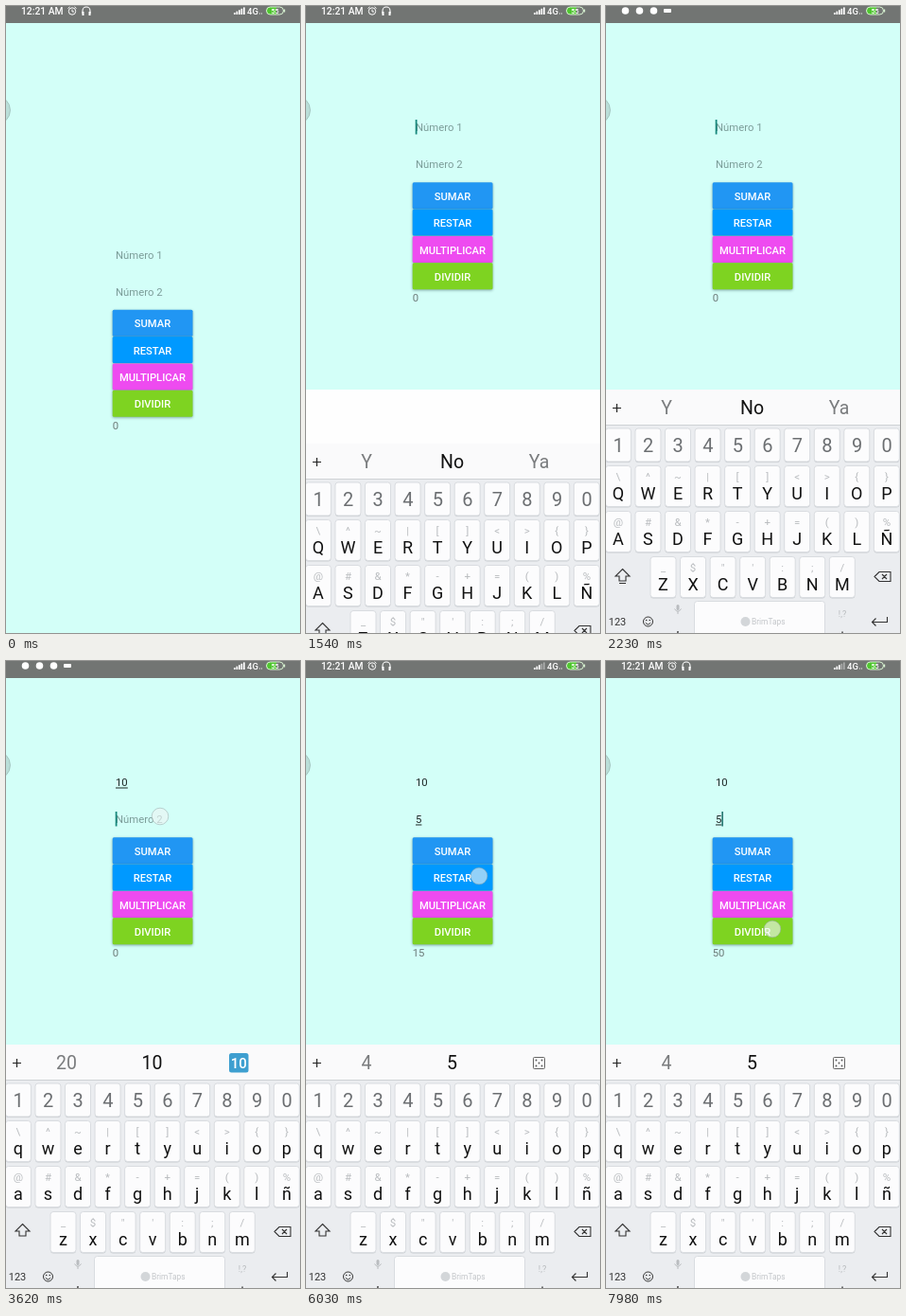
These frames come from a looping animation (311x662 px, 8 s). An HTML page with a canvas:

```html
<!DOCTYPE html>
<html lang="es">
<head>
<meta charset="utf-8">
<title>Calculadora</title>
<style>
html, body { margin: 0; width: 311px; height: 662px; overflow: hidden; }
canvas { display: block; }
</style>
</head>
<body>
<canvas id="stage" width="311" height="662"></canvas>
<script>
const c = document.getElementById('stage').getContext('2d');
const LOOP = 8000;
const OPEN = 1430, FIRST = 2500, SECOND = 2920, NEXT = 3580, FIVE = 4370;

const BUTTONS = [['SUMAR', '#2196f3'], ['RESTAR', '#0099ff'], ['MULTIPLICAR', '#ee4bf0'], ['DIVIDIR', '#7ed321']];
const ROWS = [
  { y: 485, x: 0, keys: 'QWERTYUIOP', marks: '\\^~|[]<>{}' },
  { y: 533, x: 0, keys: 'ASDFGHJKLÑ', marks: '@#&*-+=()%' },
  { y: 581, x: 47, keys: 'ZXCVBNM', marks: '_$"\':;/' }
];
// x, y, press, release
const TAPS = [
  [150, 262, 1250, 1380], [13, 463, 2440, 2570], [298, 463, 2890, 3020],
  [163, 164, 3560, 3720], [135, 461, 4330, 4400], [176, 200, 5120, 5200],
  [183, 227, 6030, 6170], [180, 257, 6950, 7130], [176, 283, 7930, 8100]
];
const CARET = [[360, 850], [1250, 1740], [2230, 2690], [2890, 3420], [3560, 4100],
  [4370, 4830], [5250, 5700], [6140, 6590], [7030, 7480], [7930, 8000]];

const clamp = v => Math.max(0, Math.min(1, v));
const ramp = (t, from, to) => clamp((t - from) / (to - from));
// Last value whose start time has passed
const pick = (t, steps) => steps.filter(s => t >= s[0]).pop()[1];

function text(s, x, y, size, color, align = 'left', weight = 400) {
  c.font = `${weight} ${size}px Roboto, sans-serif`;
  c.textAlign = align;
  c.fillStyle = color;
  c.fillText(s, x, y);
}

function box(x, y, w, h, r, fill, stroke) {
  c.beginPath();
  c.roundRect(x, y, w, h, r);
  if (fill) { c.fillStyle = fill; c.fill(); }
  if (stroke) { c.strokeStyle = stroke; c.stroke(); }
}

function disc(x, y, r, fill, stroke) {
  c.beginPath();
  c.arc(x, y, r, 0, 7);
  if (fill) { c.fillStyle = fill; c.fill(); }
  if (stroke) { c.strokeStyle = stroke; c.stroke(); }
}

function line(d, color, width = 1) {
  c.strokeStyle = color;
  c.lineWidth = width;
  c.stroke(new Path2D(d));
  c.lineWidth = 1;
}

function rect(x, y, w, h, fill) {
  c.fillStyle = fill;
  c.fillRect(x, y, w, h);
}

function status(t) {
  rect(0, 0, 311, 18, '#727573');
  c.globalAlpha = t < 3000 ? 1 - ramp(t, 1720, 1860) : ramp(t, 4350, 4610);
  text('12:21 AM', 16, 9, 10.3, '#fff', 'left', 500);
  disc(70, 5.5, 3.7, null, '#fff');
  line('M70 3.5V6H72M65.5 2.5L67.5 .8M74.5 2.5L72.5 .8', '#fff');
  line('M81 8V5A4 4 0 0 1 89 5V8', '#fff', 1.1);
  rect(80.5, 6, 2, 4, '#fff');
  rect(87.5, 6, 2, 4, '#fff');
  c.globalAlpha = t < 3000 ? ramp(t, 1860, 2020) : 1 - ramp(t, 4200, 4350);
  for (const x of [20.5, 35.5, 50.5]) disc(x, 5, 3.8, '#fff');
  box(61, 3, 8, 4, 1, '#fff');
  c.globalAlpha = 1;
  for (let i = 0; i < 5; i++) {
    const h = 2 + i * 1.4;
    rect(241 + i * 2.5, 9 - h, 1.7, h, t > 5200 && i > 2 ? '#a9abaa' : '#fff');
  }
  text('4G', 255, 9, 9.5, '#fff', 'left', 500);
  rect(268, 7, 1, 2, '#b5b7b6');
  rect(270, 7, 1, 2, '#b5b7b6');
  box(275.5, 1, 18, 8, 4, '#727573');
  box(275.5, 1, 10.5, 8, [4, 0, 0, 4], '#4fc62f');
  box(275.5, 1, 18, 8, 4, null, '#d9f5d3');
  rect(294, 3.5, 1.2, 3, '#d9f5d3');
  text('55', 284.5, 7.7, 7.2, '#fff', 'center', 500);
}

function field(value, hint, y, underline) {
  text(value || hint, 116, y, 11.3, value ? '#1d2625' : '#7c9d99');
  if (value && underline) rect(116, y + 1.5, value.length * 6.4, 1, '#1d2625');
}

function app(t) {
  rect(0, 0, 311, 662, '#d3fff8');
  const up = t >= OPEN ? 134.5 : 0;
  const first = pick(t, [[0, ''], [FIRST, '1'], [SECOND, '10']]);
  const second = t >= FIVE ? '5' : '';
  const y1 = 266.5 - up, y2 = 305.5 - up;
  field(first, 'Número 1', y1, t < 3720);
  field(second, 'Número 2', y2, true);

  if (CARET.some(([a, b]) => t >= a && t < b)) {
    const onSecond = t >= NEXT;
    const n = (onSecond ? second : first).length;
    rect(n ? 116 + n * 6.4 : 115.7, (onSecond ? y2 : y1) - 12, n ? 1.5 : 1.8, 15.5, n ? '#176b65' : '#16877c');
  }

  BUTTONS.forEach(([label, color], i) => {
    const y = 320.8 - up + i * 28.3;
    c.save();
    c.shadowColor = 'rgba(0,40,40,.4)';
    c.shadowBlur = 3;
    c.shadowOffsetY = 1;
    box(112.7, y, 84.8, 28, 1.5, color);
    c.restore();
    text(label, 155, y + 18.6, 11.2, '#fff', 'center', 500);
  });
  text(pick(t, [[0, '0'], [5200, '15'], [6170, '5'], [7130, '50']]), 112.7, 446.5 - up, 11.3, '#6d7b79');
  disc(-10.5, 110, 15, 'rgba(150,175,170,.4)', 'rgba(130,155,150,.45)');
}

function keycap(s) {
  box(236, 414, 20.5, 20.5, 2.5, '#3e9fd0');
  text(s, 246.2, 430, 15, '#fff', 'center', 500);
}

function dice() {
  box(240.5, 418.5, 12, 12, 1, null, '#666');
  for (const [x, y] of [[-3, -3], [3, -3], [0, 0], [-3, 3], [3, 3]]) disc(246.5 + x, 424.5 + y, .9, '#555');
}

function suggestions(t) {
  const words = ['Y', 'No', 'Ya'];
  const [a, b, extra] = pick(t, [[0, words], [FIRST, ['2', '1', '1']], [SECOND, ['20', '10', '10']],
    [3740, words], [FIVE, ['4', '5', 'dice']]]);
  rect(0, 405, 311, 38, '#fafafb');
  line('M7 424.5H16M11.5 420V429', '#222', 1.2);
  text(a, 64, 431, 19.5, '#7a7c7e', 'center');
  text(b, 154.5, 431, 19.5, '#111', 'center');
  if (extra === 'dice') dice();
  else if (extra === 'Ya') text(extra, 246.5, 431, 19.5, '#7a7c7e', 'center');
  else keycap(extra);
}

function key(x, y, w, h) {
  box(x, y + 1, w, h, 3, '#c9cdd1');
  box(x, y, w, h, 3, '#fcfcfd', '#d9dce0');
}

function keyboard(t) {
  const upper = t < FIRST || (t >= 3740 && t < FIVE);
  rect(0, 405, 311, 257, '#ebedf0');
  suggestions(t);
  rect(0, 442, 311, 1, '#cfd2d5');

  for (let i = 0; i < 10; i++) {
    const x = -.6 + i * 31.55;
    key(x, 446, 27, 35);
    text((i + 1) % 10, x + 13.7, 471, 20, '#6c6f72', 'center');
  }
  for (const row of ROWS) {
    [...row.keys].forEach((k, i) => {
      const x = (row.x || -.6) + i * 31.55;
      key(x, row.y + .5, 27, 43);
      text(row.marks[i], x + 13.5, row.y + 16, 11.5, '#b9bcbf', 'center');
      text(upper ? k : k.toLowerCase(), x + 13.5, row.y + 36, 18, '#111', 'center');
    });
  }

  line('M17.5 594.5L25 602H21V607H14V602H10Z' + (upper ? 'M14 609.5H21' : ''), '#333', 1.1);
  line('M284 602.5L289 597.5H301V607.5H289ZM292 600L297 605M297 600L292 605', '#333', 1.1);

  key(93.5, 628.5, 138, 40);
  disc(147.5, 650, 5, '#d3d6d9');
  text('BrimTaps', 154, 653, 8.4, '#c3c6c9');
  text('123', 12, 654, 11, '#333', 'center');
  disc(44.5, 650, 5, null, '#333');
  disc(42.7, 648.5, .8, '#333');
  disc(46.3, 648.5, .8, '#333');
  line('M41.8 651.2Q44.5 654.6 47.2 651.2', '#333');
  box(74.5, 632, 3, 6, 1.5, '#b9bcbf');
  line('M72.5 636.5Q76 642 79.5 636.5M76 639V642', '#b9bcbf');
  text(',', 76, 662, 14, '#222', 'center');
  text('!,?', 250, 645, 9, '#b9bcbf', 'center');
  text('.', 250, 662, 14, '#222', 'center');
  line('M297.5 645V650.5H281.5M285.5 646.5L281.5 650.5L285.5 654.5', '#333', 1.1);
}

function taps(t) {
  for (const [x, y, down, up] of TAPS) {
    if (t < down || t > up + 70) continue;
    c.globalAlpha = 1 - ramp(t, up, up + 70);
    disc(x, y, 8.8, 'rgba(238,244,244,.62)', 'rgba(150,165,165,.5)');
  }
  c.globalAlpha = 1;
}

function draw(t) {
  app(t);
  if (t >= OPEN) {
    rect(0, 405, 311, 257, '#fefefe');
    c.save();
    c.translate(0, Math.round(257 * (1 - ramp(t, OPEN, OPEN + 280)) ** 3));
    keyboard(t);
    c.restore();
  }
  taps(t);
  status(t);
}

const start = performance.now();
function tick() {
  draw((performance.now() - start) % LOOP);
  requestAnimationFrame(tick);
}
tick();
</script>
</body>
</html>
```
